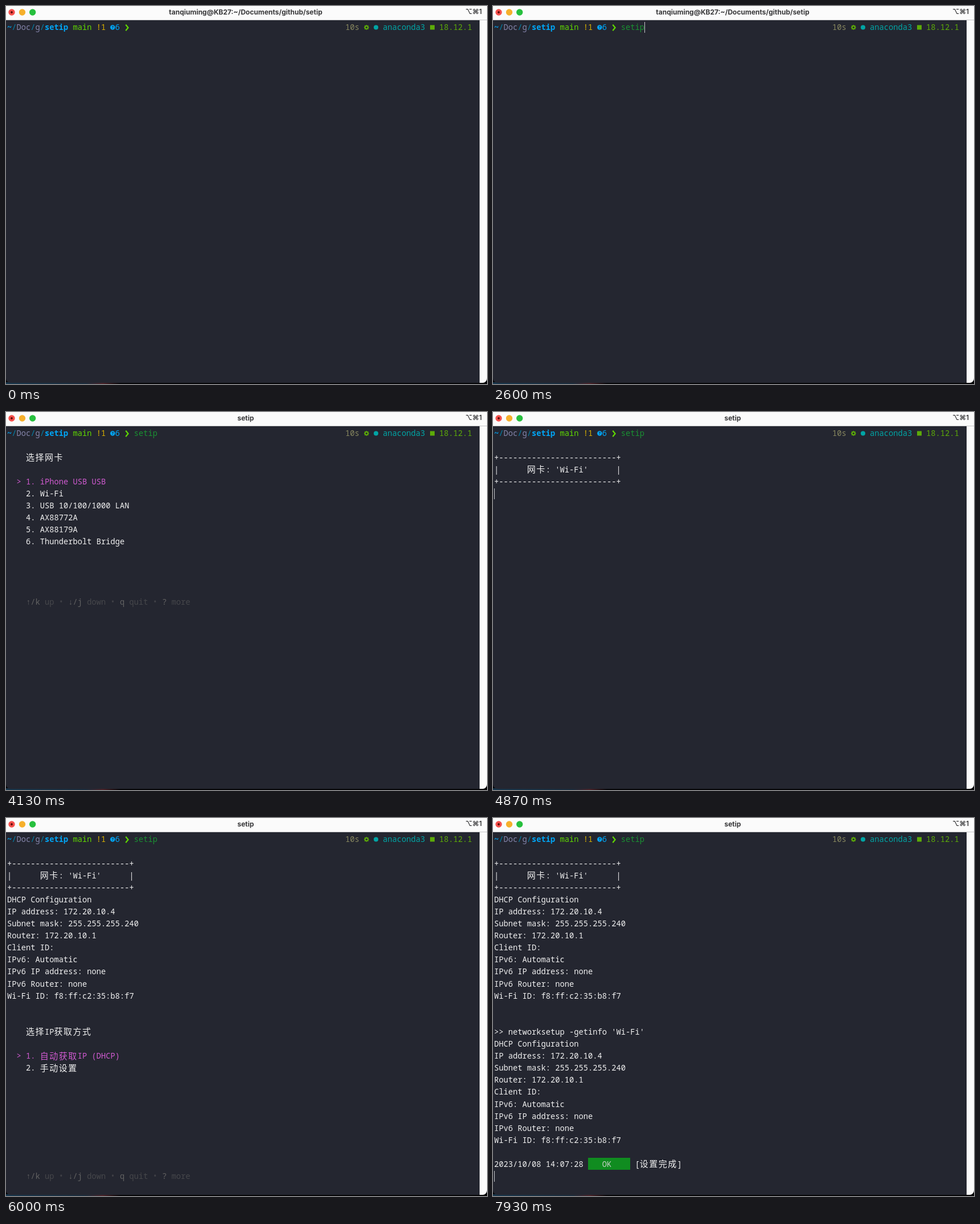
An HTML page with a canvas for the animation above (8000 ms loop, 845 by 663 pixels).

```html
<!DOCTYPE html>
<html lang="zh-CN">
<head>
<meta charset="utf-8">
<title>setip</title>
<style>
  html, body { margin: 0; width: 100%; height: 100%; overflow: hidden; background: #000; }
  canvas { display: block; }
</style>
</head>
<body>
<canvas id="stage" width="845" height="663"></canvas>
<script>
const W = 845, H = 663, LOOP = 8000;
const CELL = 8.25, LINE = 21.1, LEFT = 2, TOP = 26.4;
const MONO = '13.75px "Noto Sans Mono", "DejaVu Sans Mono", monospace';
const CJK = '15px "Noto Sans CJK SC", "Noto Sans CJK", "Noto Sans CJK JP", sans-serif';
const UI = '12px Inter, "DejaVu Sans", sans-serif';

const C = {
  bg: '#242630', bar: '#fbfbfb', text: '#f0f0f0', pick: '#d05ad0',
  key: '#626262', desc: '#46474b', sep: '#404147',
  blue: '#00a5f5', slash: '#0087af', dir: '#8585ab', branch: '#5fd700',
  dirty: '#d7af00', time: '#87875f', env: '#00a5a5', node: '#5caa08',
  cmd: '#1a9132', ok: '#108c20'
};

// Moments of the session, in ms
const T = { blink: 400, type: 2150, key: 90, menu: 3000, down: 4300,
            chosen: 4800, info: 5250, confirm: 7000, done: 7200 };

const INFO = [
  'DHCP Configuration', 'IP address: 172.20.10.4', 'Subnet mask: 255.255.255.240',
  'Router: 172.20.10.1', 'Client ID:', 'IPv6: Automatic',
  'IPv6 IP address: none', 'IPv6 Router: none', 'Wi-Fi ID: f8:ff:c2:35:b8:f7'
];
const CARDS = ['iPhone USB USB', 'Wi-Fi', 'USB 10/100/1000 LAN',
               'AX88772A', 'AX88179A', 'Thunderbolt Bridge'];
const MODES = ['自动获取IP (DHCP)', '手动设置'];

const ctx = document.getElementById('stage').getContext('2d');

const colX = col => LEFT + col * CELL;
const rowY = row => TOP + row * LINE;

// Writes on the character grid; Chinese characters take two cells
function put(row, col, str, color = C.text, bold = false) {
  ctx.fillStyle = color;
  ctx.textAlign = 'left';
  for (const ch of str) {
    const wide = ch >= '\u2e80';
    ctx.font = wide ? CJK : (bold ? 'bold ' : '') + MONO;
    ctx.fillText(ch, colX(col), rowY(row) + (wide ? 16.3 : 15.9));
    col += wide ? 2 : 1;
  }
}

function dot(x, y, r, color) {
  ctx.fillStyle = color;
  ctx.beginPath();
  ctx.arc(x, y, r, 0, Math.PI * 2);
  ctx.fill();
}

function cursor(row, col) {
  ctx.fillStyle = '#c6c7ca';
  ctx.fillRect(Math.round(colX(col)), Math.round(rowY(row) + 1.6), 1, 19);
}

function gear(x, y) {
  ctx.strokeStyle = C.node;
  ctx.lineWidth = 2;
  ctx.beginPath();
  ctx.arc(x, y, 2.6, 0, Math.PI * 2);
  ctx.stroke();
  ctx.lineWidth = 1.5;
  for (let i = 0; i < 8; i++) {
    const a = i * Math.PI / 4, cx = Math.cos(a), cy = Math.sin(a);
    ctx.beginPath();
    ctx.moveTo(x + cx * 3, y + cy * 3);
    ctx.lineTo(x + cx * 4.4, y + cy * 4.4);
    ctx.stroke();
  }
}

function frame(title) {
  ctx.fillStyle = '#050507';
  ctx.fillRect(0, 0, W, H);
  const desk = ctx.createLinearGradient(0, 0, 200, 0);
  desk.addColorStop(0, '#17364c');
  desk.addColorStop(0.7, '#1b2c3c');
  desk.addColorStop(0.85, '#4a2228');
  desk.addColorStop(1, '#050507');
  ctx.fillStyle = desk;
  ctx.fillRect(0, 660, 200, 3);

  ctx.save();
  ctx.beginPath();
  ctx.roundRect(0, -10, W, 671, 8);
  ctx.clip();
  ctx.fillStyle = C.bg;
  ctx.fillRect(0, 0, W, H);
  ctx.fillStyle = C.bar;
  ctx.fillRect(0, 0, W, 24);
  ctx.fillRect(832, 24, 13, H);
  ctx.fillStyle = '#c8c8ca';
  ctx.fillRect(0, 24, W, 1);
  ctx.restore();

  dot(10, 11, 5.7, '#f4504c');
  dot(10, 11, 1.9, '#5c0a08');
  dot(28.5, 11, 5.7, '#f6b02c');
  dot(46.7, 11, 5.7, '#27c03e');

  ctx.fillStyle = '#38383a';
  ctx.font = 'bold ' + UI;
  ctx.textAlign = 'center';
  ctx.fillText(title, 421, 15);
  ctx.font = '600 ' + UI;
  ctx.textAlign = 'right';
  ctx.fillText('⌥⌘1', 836, 14);
}

function prompt(typed) {
  put(0, 0, '~', C.blue, true);
  put(0, 1, '/', C.slash);
  put(0, 2, 'Doc', C.dir);
  put(0, 5, '/', C.slash);
  put(0, 6, 'g', C.dir);
  put(0, 7, '/', C.slash);
  put(0, 8, 'setip', C.blue, true);
  put(0, 14, 'main', C.branch);
  put(0, 19, '!1', C.dirty);

  dot(187.3, 37.5, 4.2, C.blue);
  ctx.fillStyle = C.bg;
  ctx.font = 'bold 7px "Noto Sans", sans-serif';
  ctx.textAlign = 'center';
  ctx.fillText('?', 187.3, 40);
  put(0, 23, '6', C.blue);

  ctx.strokeStyle = C.branch;
  ctx.lineWidth = 2.2;
  ctx.beginPath();
  ctx.moveTo(210.3, 32.8);
  ctx.lineTo(214.6, 38);
  ctx.lineTo(210.3, 43.2);
  ctx.stroke();
  put(0, 27, typed, C.cmd);

  put(0, 72, '10s', C.time);
  gear(633.3, 37.5);
  dot(650, 37.5, 4, C.env);
  put(0, 80, 'anaconda3', C.env);
  ctx.fillStyle = C.node;
  ctx.fillRect(745, 33.5, 8, 8);
  put(0, 92, '18.12.1', C.node);
}

function menu(row, title, items, picked, hintRow) {
  put(row, 4, title);
  items.forEach((item, i) => {
    const on = i === picked, r = row + 2 + i;
    if (on) put(r, 2, '>', C.pick);
    put(r, 4, `${i + 1}. ${item}`, on ? C.pick : C.text);
  });
  put(hintRow, 4, '↑/k', C.key);
  put(hintRow, 8, 'up', C.desc);
  put(hintRow, 13, '↓/j', C.key);
  put(hintRow, 17, 'down', C.desc);
  put(hintRow, 24, 'q', C.key);
  put(hintRow, 26, 'quit', C.desc);
  put(hintRow, 33, '?', C.key);
  put(hintRow, 35, 'more', C.desc);
  for (const col of [11, 22, 31]) put(hintRow, col, '•', C.sep);
}

function lines(row, list) {
  list.forEach((s, i) => put(row + i, 0, s));
}

function cardBox() {
  const rule = '+' + '-'.repeat(25) + '+', gap = ' '.repeat(6);
  lines(2, [rule, `|${gap}网卡: 'Wi-Fi'${gap}|`, rule]);
}

function result() {
  put(16, 0, ">> networksetup -getinfo 'Wi-Fi'");
  lines(17, INFO);
  put(27, 0, '2023/10/08 14:07:28');
  ctx.fillStyle = C.ok;
  ctx.fillRect(167, 596, 74, 21);
  put(27, 23, 'OK', '#c4cfc4');
  put(27, 30, '[设置完成]');
  cursor(28, 0);
}

function draw(t) {
  const running = t >= T.menu;
  frame(running ? 'setip' : 'tanqiuming@KB27:~/Documents/github/setip');
  const count = Math.max(0, Math.min(5, Math.floor((t - T.type) / T.key) + 1));
  prompt('setip'.slice(0, count));

  if (!running) {
    const lit = t >= T.blink && Math.floor((t - T.blink) / 600) % 2 === 0;
    if (count || lit) cursor(0, 27 + count);
    return;
  }
  if (t < T.chosen) {
    menu(2, '选择网卡', CARDS, t < T.down ? 0 : 1, 14);
    return;
  }
  cardBox();
  if (t < T.info) {
    cursor(5, 0);
    return;
  }
  lines(5, INFO);
  if (t < T.confirm) menu(16, '选择IP获取方式', MODES, 0, 28);
  else if (t < T.done) cursor(16, 0);
  else result();
}

const start = performance.now();
function tick() {
  draw((performance.now() - start) % LOOP);
  requestAnimationFrame(tick);
}
tick();
</script>
</body>
</html>
```
